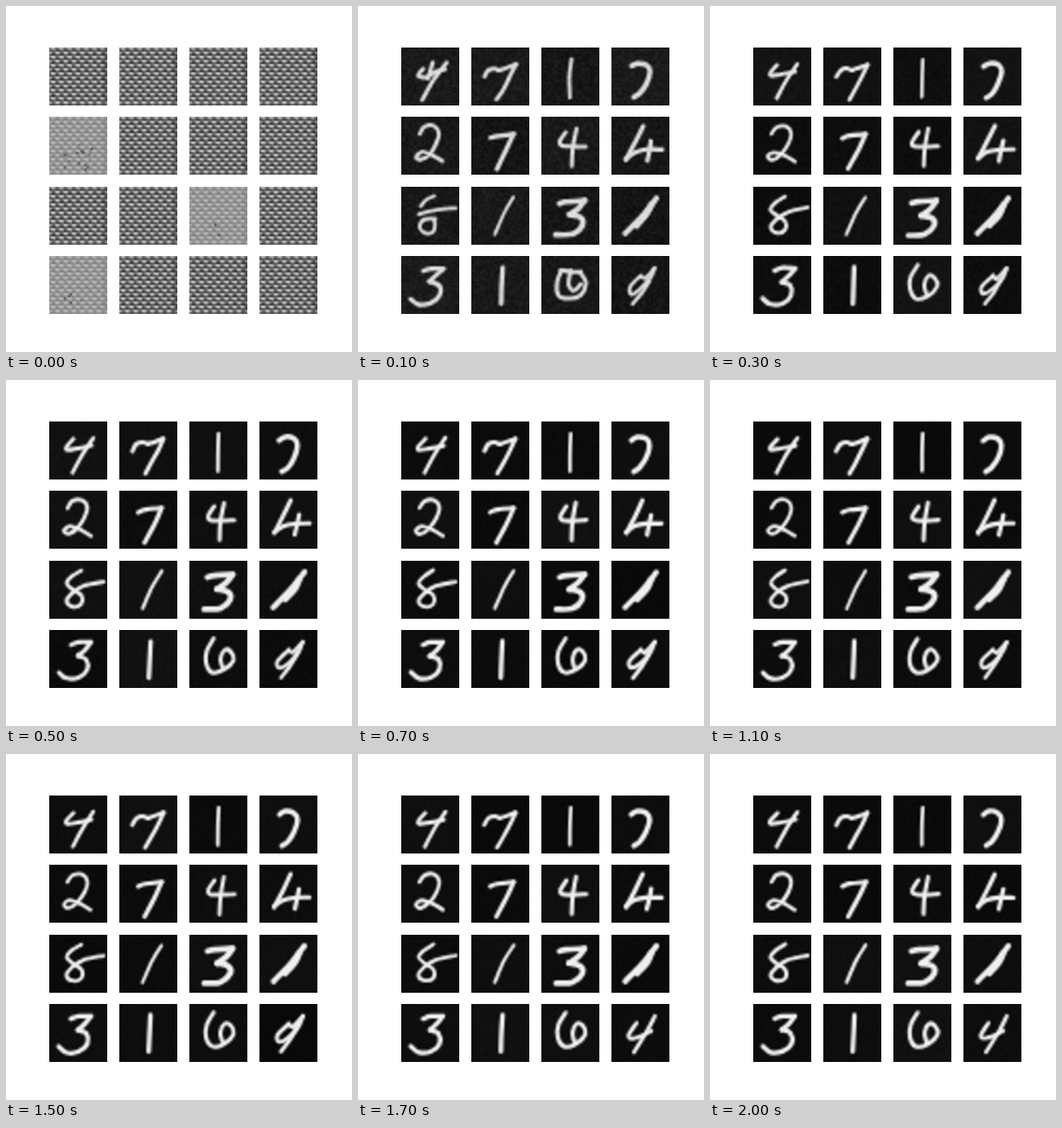
Animation, 400 px wide and 400 px high, one loop 2200 ms. Source, as an HTML page with a canvas:

```html
<!DOCTYPE html>
<html lang="en">
<head>
<meta charset="utf-8">
<title>Handwritten digits taking shape</title>
<style>
html, body { margin: 0; width: 100%; height: 100%; overflow: hidden; background: #fff; }
canvas { display: block; width: 400px; height: 400px; }
</style>
</head>
<body>
<canvas id="stage" width="400" height="400"></canvas>
<script>
const LOOP = 2200, STEP = 100, LAST = 20;
const SIZE = 67, GRID = 28;
const COLS = [50, 131, 212, 293], ROWS = [48, 128, 209, 289];

// Pen width, then strokes; "|" lifts the pen.
const rowA = [
  [4.6, "28,20 20,29 21,33 33,31 49,28|51,19 39,37 27,59"],
  [4.8, "15,34 20,26 27,24 33,26|33,26 42,23 51,20|51,20 45,33 37,48 30,60"],
  [4.2, "34,14 33,35 33,57"],
  [6, "23,22 30,18 40,20 44,28 40,42 33,53 26,58"]
];
const rowB = [
  [4.4, "21,20 27,12 38,11 44,19 41,31 32,44 22,50 17,46 24,41 36,45 48,52"],
  [5.2, "22,25 30,22 49,20|49,20 41,38 29,60"],
  [4.8, "29,18 22,29 24,34 36,35 52,34|40,14 36,36 35,57"],
  [5.2, "36,11 28,28 17,49|17,48 27,41 40,38 58,38|46,28 44,38 41,51"]
];
const rowC = [
  [4.4, "37,11 26,18 20,26 27,33 37,40 37,50 27,53 20,47 26,38 40,29 63,24"],
  [4, "49,12 38,30 27,55"],
  [6.6, "21,19 29,17 50,16|50,16 43,25 32,33|32,33 45,36 47,45 36,55 17,56"],
  [6.4, "52,13 38,31 16,54|45,22 39,32 30,42|47,20 41,33 30,45"]
];
const rowD = [
  [5.2, "25,17 34,14 48,14|48,14 41,23 33,30|33,30 43,34 44,46 34,55 20,56 11,49"],
  [5.4, "36,13 35,34 34,55"],
  [4.8, "28,10 20,24 19,38 26,49 40,46 51,35 48,25 41,23 36,33 38,43"],
  [4.6, "29,22 20,36 24,40 35,37 46,31|50,14 41,32 26,56"]
];
const shapes = [...rowA, ...rowB, ...rowC, ...rowD];

// Unsettled forms: last step in which each one is used, then strokes.
const early = {
  0: [1, "25,24 19,33 29,34 40,27 51,25|37,17 31,36|52,17 38,38 25,60"],
  8: [1, "38,11 28,16 22,23|20,32 38,28 63,25|39,37 28,37 21,46 28,54 38,50 38,39 28,37"],
  14: [1, "23,16 18,30 20,45 32,49 46,46 51,31 46,20|35,17 32,32 37,41 45,32|22,17 34,18 46,19"],
  15: [16, "34,23 21,36 23,44 34,38 45,26 50,14|50,14 39,26 34,23|43,29 35,42 25,55"]
};
const pale = { 4: 16, 10: 2, 12: 5 };

const pen = document.getElementById("stage").getContext("2d");
const tile = document.createElement("canvas");
tile.width = tile.height = GRID;
const ink = tile.getContext("2d", { willReadFrequently: true });

function seeded(seed) {
  let s = seed * 2654435761 >>> 0;
  return () => {
    s = s + 0x6D2B79F5 >>> 0;
    let v = Math.imul(s ^ s >>> 15, s | 1);
    v ^= v + Math.imul(v ^ v >>> 7, v | 61);
    return ((v ^ v >>> 14) >>> 0) / 4294967296;
  };
}

const parse = text => text.split("|").map(part =>
  part.split(" ").map(pair => pair.split(",").map(Number)));

function curve(points) {
  const at = i => points[Math.max(0, Math.min(points.length - 1, i))];
  ink.beginPath();
  ink.moveTo(...at(0));
  for (let i = 0; i < points.length - 1; i++) {
    const [a, b, c, d] = [at(i - 1), at(i), at(i + 1), at(i + 2)];
    ink.bezierCurveTo(
      b[0] + (c[0] - a[0]) / 6, b[1] + (c[1] - a[1]) / 6,
      c[0] - (d[0] - b[0]) / 6, c[1] - (d[1] - b[1]) / 6, c[0], c[1]);
  }
  ink.stroke();
}

// Visits every cell and replaces its grey level.
function eachCell(fn) {
  const image = ink.getImageData(0, 0, GRID, GRID);
  for (let i = 0; i < GRID * GRID; i++) {
    const v = fn(i % GRID, Math.floor(i / GRID), image.data[i * 4]);
    image.data.fill(v, i * 4, i * 4 + 3);
    image.data[i * 4 + 3] = 255;
  }
  ink.putImageData(image, 0, 0);
}

function weave(n) {
  const rand = seeded(n + 1);
  const motif = [[135, 225, 200, 95], [65, 85, 110, 55], [195, 110, 105, 215], [100, 45, 50, 90]];
  const spots = pale[n];
  eachCell((x, y) => {
    let v = motif[y % 4][x % 4] + (rand() - 0.5) * 14;
    if (x > 25) v = v * 0.7 + 12;
    if (y === 0 || y === GRID - 1) v = v * 0.6 + 50;
    return spots ? 150 + (v - 110) * 0.42 : v;
  });
  if (!spots) return;
  for (let i = 0; i < spots; i++) {
    ink.fillStyle = `rgba(35,35,35,${0.3 + rand() * 0.5})`;
    ink.fillRect(7 + Math.floor(rand() * 14), 13 + Math.floor(rand() * 13), 1, 1);
  }
}

function digit(n, step) {
  const rand = seeded(n * 97 + step * 13 + 5);
  const fresh = Math.exp(-(step - 1) / 1.5);
  const [width, settled] = shapes[n];
  const form = early[n] && step <= early[n][0] ? early[n][1] : settled;
  const base = 9 + rand() * 8 + fresh * 11;
  const wobble = 0.5 + fresh * 1.2;
  const light = Math.round(238 - fresh * 22);

  ink.fillStyle = "#000";
  ink.fillRect(0, 0, GRID, GRID);
  ink.save();
  ink.scale(GRID / SIZE, GRID / SIZE);
  ink.lineCap = ink.lineJoin = "round";
  ink.lineWidth = width + (rand() - 0.5) * 0.4;
  ink.strokeStyle = `rgb(${light},${light},${light})`;
  const moved = new Map();
  for (const stroke of parse(form)) {
    curve(stroke.map(p => {
      const key = p.join();
      if (!moved.has(key)) moved.set(key, p.map(v => v + (rand() - 0.5) * wobble));
      return moved.get(key);
    }));
  }
  ink.restore();
  const grain = 4 + fresh * 12;
  eachCell((x, y, v) => base + v * (1 - base / 255) + (rand() - 0.5) * grain);
}

function draw(step) {
  pen.fillStyle = "#fff";
  pen.fillRect(0, 0, 400, 400);
  pen.imageSmoothingEnabled = true;
  pen.imageSmoothingQuality = "high";
  for (let n = 0; n < 16; n++) {
    step ? digit(n, step) : weave(n);
    pen.drawImage(tile, COLS[n % 4], ROWS[n >> 2], SIZE, SIZE);
  }
}

let shown = -1;
const start = performance.now();
function tick() {
  const time = (performance.now() - start) % LOOP;
  const step = Math.min(LAST, Math.floor(time / STEP));
  if (step !== shown) draw(shown = step);
  requestAnimationFrame(tick);
}
tick();
</script>
</body>
</html>
```
